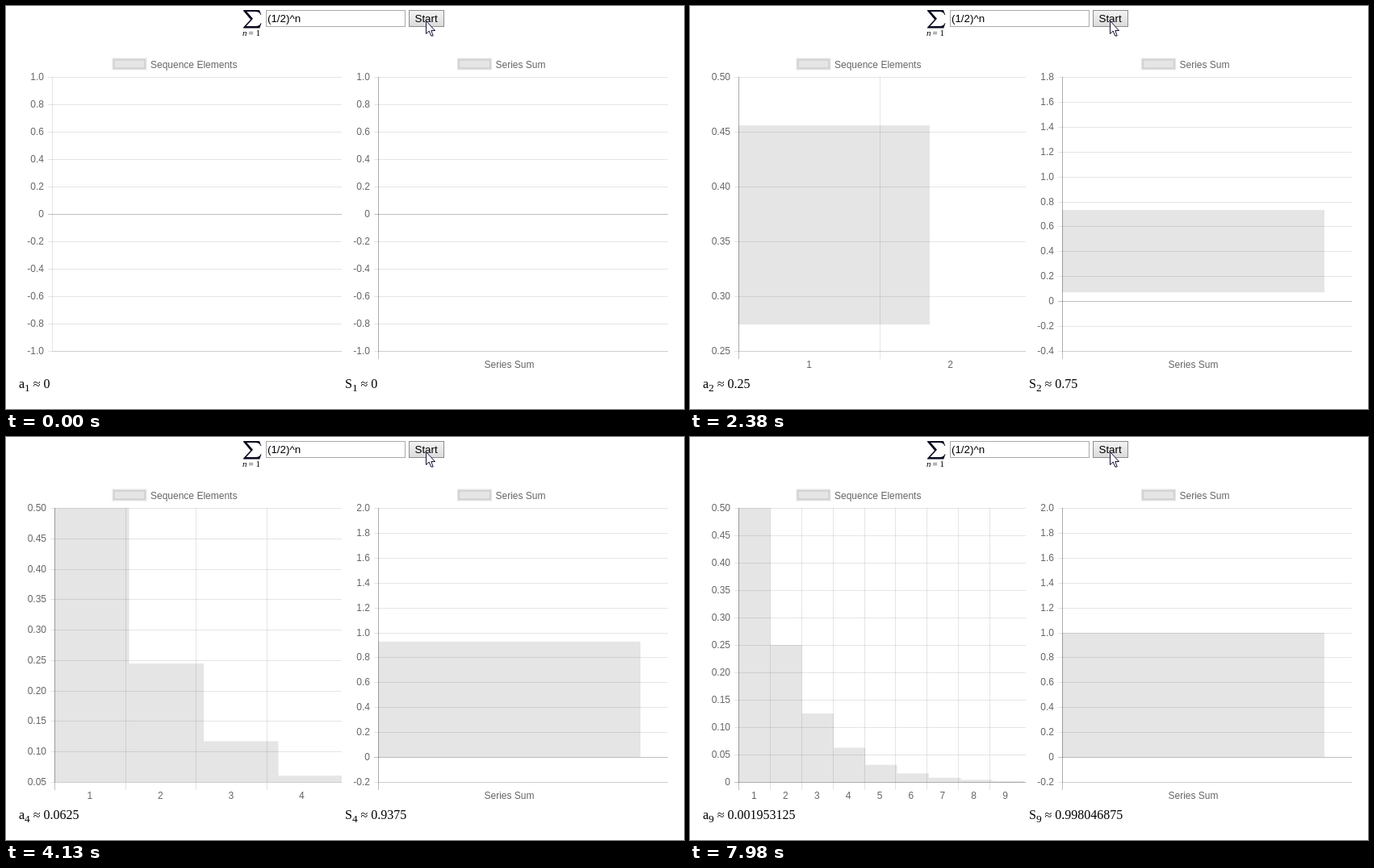
Animation of 840x500 px, one loop 8000 ms. Source, as an HTML page with a canvas:

```html
<!DOCTYPE html>
<html>
<head>
<meta charset="utf-8">
<title>Series sum</title>
<style>
html, body { margin: 0; width: 100%; height: 100%; overflow: hidden; background: #fff; }
canvas { display: block; }
</style>
</head>
<body>
<canvas width="840" height="500"></canvas>
<script>
const ctx = document.querySelector('canvas').getContext('2d');
const SANS = '"Liberation Sans", Arial, sans-serif';
const SERIF = '"Liberation Serif", "Times New Roman", serif';
const TOP = 88, BOTTOM = 428;
const LOOP = 8000, STEP = 70, DURATION = 779;
// When each term appears, and how far its transition has run by then.
const SHOWN = [1470, 2240, 3080, 3920, 4690, 5460, 6300, 7000, 7700];
const HEAD = [.017, .049, .036, .087, .07, .053, .124, .1, .09];

const lerp = (a, b, p) => a + (b - a) * p;
const term = n => 2 ** -n;
const total = n => 1 - 2 ** -n;

function text(str, x, y, font, color = '#666', align = 'left') {
  ctx.font = font;
  ctx.fillStyle = color;
  ctx.textAlign = align;
  ctx.fillText(str, x, y);
  return x + ctx.measureText(str).width;
}

function line(x1, y1, x2, y2, alpha) {
  ctx.strokeStyle = `rgba(0,0,0,${alpha})`;
  ctx.lineWidth = 1;
  ctx.beginPath();
  ctx.moveTo(x1, y1);
  ctx.lineTo(x2, y2);
  ctx.stroke();
}

function scale(min, max, step, left, width) {
  const y = v => BOTTOM - (BOTTOM - TOP) * (v - min) / (max - min);
  return { min, max, step, left, width, y, base: y(Math.max(min, 0)) };
}

function termScale(n) {
  const left = n < 2 ? 57 : 60, width = n ? (410 - left) / n : 0;
  if (n < 2) return scale(n ? -.6 : -1, n ? 1.6 : 1, .2, left, width);
  return scale([.25, .1, .05][n - 2] || 0, .5, .05, left, width);
}

function sumScale(n) {
  const [min, max] = [[-1, 1], [-.6, 1.6], [-.4, 1.8]][n] || [-.2, 2];
  return scale(min, max, .2, 461, 325);
}

function grid(s, right, labels, title, legendX) {
  ctx.fillStyle = 'rgba(0,0,0,.1)';
  ctx.fillRect(legendX, 66, 40, 12);
  ctx.strokeStyle = 'rgba(0,0,0,.1)';
  ctx.lineWidth = 3;
  ctx.strokeRect(legendX, 66, 40, 12);
  text(title, legendX + 46, 77, '12px ' + SANS);

  const count = Math.round((s.max - s.min) / s.step);
  for (let i = 0; i <= count; i++) {
    const v = s.min + i * s.step, y = Math.round(s.y(v)), zero = Math.abs(v) < 1e-9;
    line(s.left - 5, y + .5, right, y + .5, zero ? .25 : .1);
    text(zero ? '0' : v.toFixed(s.step < .1 ? 2 : 1), s.left - 10, y + 4, '12px ' + SANS, '#666', 'right');
  }
  labels.forEach((label, i) => {
    const x = Math.round(s.left + i * s.width) + .5;
    line(x, TOP, x, BOTTOM + 10, i ? .1 : .25);
    text(label, s.left + (i + .5) * s.width, 449, '12px ' + SANS, '#666', 'center');
  });
  line(s.left + .5, TOP, s.left + .5, BOTTOM, .1);
  line(s.left, BOTTOM + .5, right, BOTTOM + .5, .1);
}

// Bars glide from their place on the old scale to the new one.
function bars(from, to, p, right, tops) {
  ctx.save();
  ctx.beginPath();
  ctx.rect(to.left, TOP, right - to.left, BOTTOM - TOP);
  ctx.clip();
  ctx.fillStyle = 'rgba(0,0,0,.1)';
  const base = lerp(from.base, to.base, p), width = lerp(from.width, to.width, p);
  tops.forEach(([y0, y1], i) => {
    const y = lerp(y0, y1, p);
    ctx.fillRect(lerp(from.left, to.left, p) + i * width, y, width, base - y);
  });
  ctx.restore();
}

function result(name, n, value, x) {
  x = text(name, x, 474, '16px ' + SERIF, '#000');
  x = text(n, x, 478, '13.33px ' + SERIF, '#000');
  text(' ≈ ' + value, x, 474, '16px ' + SERIF, '#000');
}

function header(pressed) {
  ctx.fillStyle = '#0a0a20';
  ctx.fill(new Path2D('M294 5H314L316.3 11H315.4C314.4 8 312.5 7 308 7H298.3L306 15.8L297.6 25H309C313 25 314.8 23.7 315.6 21.3H316.5L314.3 27.5H294V26.6L303 16.8L294 6Z'));
  text('n', 293, 37, 'italic 11px ' + SERIF, '#000');
  text('=', 300.5, 37, '11px ' + SERIF, '#000');
  text('1', 309.5, 37, '11px ' + SERIF, '#000');

  ctx.lineWidth = 1;
  ctx.strokeStyle = '#a9a9a9';
  ctx.strokeRect(322.5, 5.5, 172, 20);
  text('(1/2)^n', 324, 20, '13.33px ' + SANS, '#000');

  const shade = ctx.createLinearGradient(0, 5, 0, 26);
  shade.addColorStop(0, pressed ? '#d4d4d4' : '#f4f4f4');
  shade.addColorStop(1, pressed ? '#ececec' : '#dadada');
  ctx.fillStyle = shade;
  ctx.fillRect(499, 5, 44, 21);
  ctx.strokeStyle = '#8c8c8c';
  ctx.strokeRect(499.5, 5.5, 43, 20);
  text('Start', 506.5, 20, '13.33px ' + SANS, '#000');

  const arrow = new Path2D('M520.5 18.5V34.5L524.2 31L526.7 37H529.2L526.8 30.5H531.5Z');
  ctx.fillStyle = '#fff';
  ctx.fill(arrow);
  ctx.strokeStyle = '#101030';
  ctx.stroke(arrow);
}

function draw(now) {
  const t = Math.floor(now % LOOP / STEP) * STEP;
  const n = SHOWN.filter(s => s <= t).length, prev = Math.max(n - 1, 0);
  const run = n ? Math.min(1, HEAD[n - 1] + (t - SHOWN[n - 1]) / DURATION) : 1;
  const p = 1 - (1 - run) ** 4;

  ctx.fillStyle = '#fff';
  ctx.fillRect(0, 0, 840, 500);
  header(t >= 350 && t < 630);

  const a0 = termScale(prev), a1 = termScale(n);
  const index = Array.from({ length: n }, (_, i) => i + 1);
  grid(a1, 416, index, 'Sequence Elements', 133);
  bars(a0, a1, p, 416, index.map(i => [i < n ? a0.y(term(i)) : a0.base, a1.y(term(i))]));

  const s0 = sumScale(prev), s1 = sumScale(n);
  grid(s1, 820, ['Series Sum'], 'Series Sum', 560.5);
  bars(s0, s1, p, 820, [[s0.y(total(prev)), s1.y(total(n))]]);

  result('a', n || 1, n ? term(n) : 0, 16);
  result('S', n || 1, total(n), 420);
}

let start;
function tick(now) {
  start ??= now;
  draw(now - start);
  requestAnimationFrame(tick);
}
requestAnimationFrame(tick);
</script>
</body>
</html>
```
